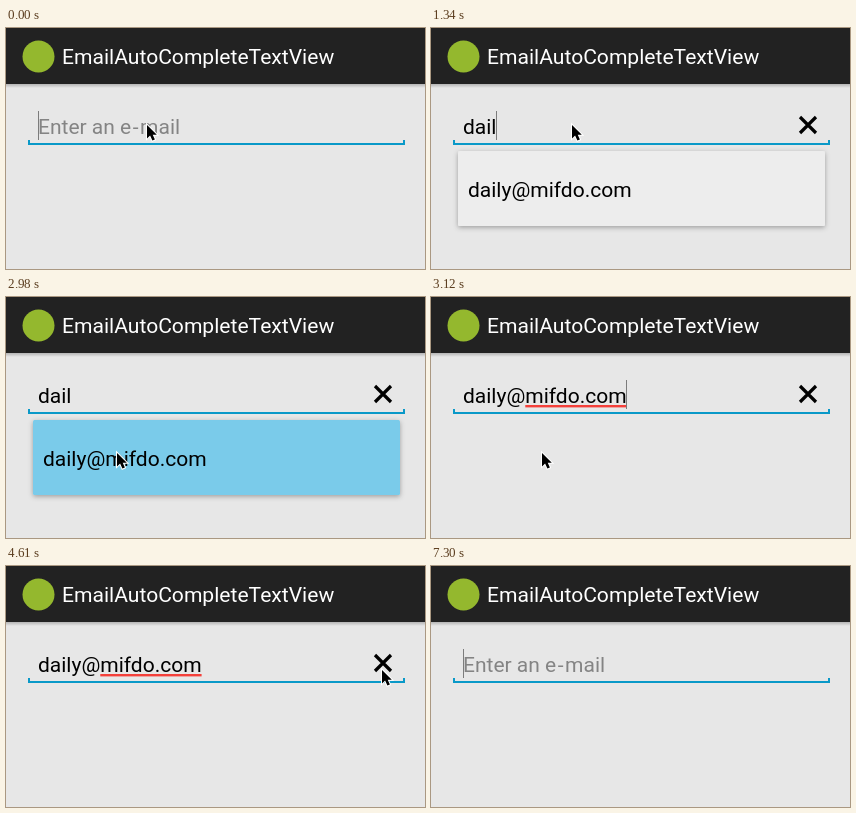
Animation, 419 px wide and 241 px high, one loop 7570 ms. Source, as an HTML page:

```html
<!DOCTYPE html>
<html lang="en">
<head>
<meta charset="utf-8">
<title>Email field</title>
<style>
  html, body { margin: 0; width: 100%; height: 100%; overflow: hidden; background: #e7e7e7; }
  svg { display: block; width: 419px; height: 241px; }
  text { font: 21px Roboto, sans-serif; white-space: pre; }
  .title { font-size: 21.08px; }
</style>
</head>
<body>
<svg viewBox="0 0 419 241">
  <defs>
    <linearGradient id="barShadow" x2="0" y2="1">
      <stop offset="0" stop-color="#000" stop-opacity=".22"/>
      <stop offset="1" stop-color="#000" stop-opacity="0"/>
    </linearGradient>
    <filter id="lift" x="-5%" y="-15%" width="110%" height="140%">
      <feDropShadow dx="0" dy="1.5" stdDeviation="2.4" flood-opacity=".32"/>
    </filter>
  </defs>
  <rect width="419" height="241" fill="#e7e7e7"/>
  <rect width="419" height="56" fill="#222"/>
  <rect y="56" width="419" height="4" fill="url(#barShadow)"/>
  <circle cx="32.5" cy="28.5" r="16" fill="#94b82e"/>
  <text class="title" x="56" y="36" fill="#fff">EmailAutoCompleteTextView</text>

  <path d="M23 112V116H398V112" fill="none" stroke="#0a99c8" stroke-width="2"/>
  <text id="hint" x="32" y="106" fill="#848484">Enter an e<tspan dx="1.5">-</tspan><tspan dx="1.5">mail</tspan></text>
  <text id="value" x="32" y="106" fill="#000"></text>
  <rect id="spelling" y="108" height="2.4" fill="#f4403a"/>
  <rect id="caret" y="83" width="1" height="29" fill="#7c7c7c"/>
  <path id="clear" d="M369 89L385 105M385 89L369 105" stroke="#000" stroke-width="3.2"/>

  <g id="popup">
    <rect id="row" x="27" y="123" width="367" height="75" rx="1.5" filter="url(#lift)"/>
    <text id="suggestion" x="37" y="169" fill="#000"></text>
  </g>
  <path id="pointer" d="M0 0V13.4L3.1 10.6L5.4 15.6L7.9 14.5L5.7 9.7H9.8Z" fill="#000" stroke="#fff" stroke-width="2" paint-order="stroke"/>
</svg>
<script>
const LOOP = 7570;
const FRAME = LOOP / 51;
const BLINK = 500;
const EMAIL = 'daily@mifdo.com';
const DOMAIN_AT = EMAIL.indexOf('@') + 1;
const KEYS = [250, 700, 1150, 1330];
const POPUP = 700, PRESS = 2900, PICK = 3000, CLEAR = 5200;

const HOME = { x: 141, y: 97 };
const MOVES = [
  { from: 1900, to: 2370, x: 111, y: 156 },
  { from: 3450, to: 4000, x: 328, y: 130 },
  { from: 4000, to: 4600, x: 376, y: 104 },
  { from: 4850, to: 5340, x: 372, y: 102 },
  { from: 6680, to: 6975, x: 330, y: 275 },
];

const byId = id => document.getElementById(id);
const [hint, value, spelling, caret, clear, popup, row, suggestion, pointer] =
  ['hint', 'value', 'spelling', 'caret', 'clear', 'popup', 'row', 'suggestion', 'pointer'].map(byId);
suggestion.textContent = EMAIL;

const progress = (time, from, to) => Math.min(1, Math.max(0, (time - from) / (to - from)));
const smooth = p => p * p * (3 - 2 * p);
const show = (el, on) => el.setAttribute('visibility', on ? 'visible' : 'hidden');

function typedLength(time) {
  if (time >= CLEAR) return 0;
  return time >= PICK ? EMAIL.length : KEYS.filter(key => key <= time).length;
}

// Every edit restarts the blink; the first phase carries over from the previous loop.
function caretVisible(time) {
  const edit = [CLEAR - LOOP, ...KEYS, PICK, CLEAR].findLast(start => start <= time);
  return (time - edit) % (2 * BLINK) < BLINK;
}

function drawField(time) {
  const count = typedLength(time);
  const complete = count === EMAIL.length;
  value.textContent = EMAIL.slice(0, count);
  const width = count ? value.getComputedTextLength() : 0;
  show(hint, !count);
  show(clear, count);
  show(caret, caretVisible(time));
  caret.setAttribute('x', Math.floor(32 + width));
  show(spelling, complete);
  if (complete) {
    const start = value.getSubStringLength(0, DOMAIN_AT);
    spelling.setAttribute('x', 32 + start);
    spelling.setAttribute('width', width - start);
  }
}

function drawPopup(time) {
  const opened = progress(time, POPUP, POPUP + 190);
  const scale = 0.98 + 0.02 * opened;
  show(popup, time >= POPUP && time < PICK);
  popup.setAttribute('transform', `translate(210.5 123) scale(${scale}) translate(-210.5 -123)`);
  popup.setAttribute('opacity', 0.78 + 0.22 * opened);
  row.setAttribute('fill', time >= PRESS ? '#7acbea' : '#ededed');
}

function drawPointer(time) {
  let { x, y } = HOME;
  for (const move of MOVES) {
    const p = smooth(progress(time, move.from, move.to));
    x += (move.x - x) * p;
    y += (move.y - y) * p;
  }
  pointer.setAttribute('transform', `translate(${x} ${y})`);
}

const began = performance.now();
function tick() {
  const elapsed = (performance.now() - began) % LOOP;
  const time = Math.floor((elapsed + 9) / FRAME) * FRAME;
  drawField(time);
  drawPopup(time);
  drawPointer(time);
  requestAnimationFrame(tick);
}
tick();
</script>
</body>
</html>
```
